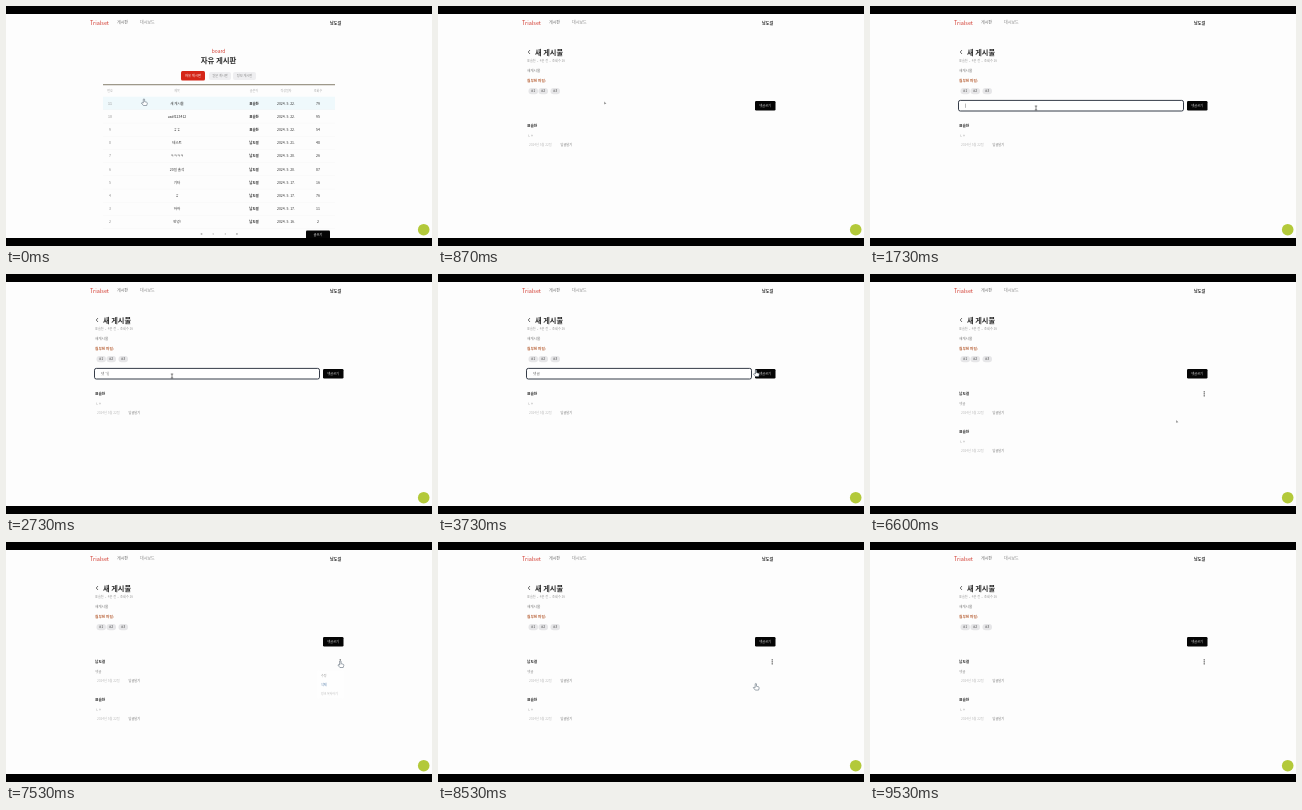
An HTML page that plays this animation: 426 by 240 pixels, repeating every 9590 ms.

```html
<!DOCTYPE html>
<html>
<head>
<meta charset="utf-8">
<style>
html, body { margin: 0; width: 100%; height: 100%; overflow: hidden; background: #fdfdfd; }
svg { display: block; width: 100%; height: 100%; }
text { font-family: "Noto Sans CJK KR", "Noto Sans CJK", "Noto Sans", sans-serif; white-space: pre; }
</style>
</head>
<body>
<svg id="stage" viewBox="0 0 426 240"></svg>
<script>
const LOOP = 9590, STEPS_PER_MS = 0.015;
const RED = '#d23b30', INK = '#2b2b2b', GREY = '#999', ME = '남도결', OTHER = '표슬찬';

// y is the vertical middle of the text
const text = (x, y, size, str, fill = INK, extra = '') =>
  `<text x="${x}" y="${y + size * 0.37}" font-size="${size}" fill="${fill}" ${extra}>${str}</text>`;
const BOLD = 'font-weight="700"', MID = 'text-anchor="middle"';
const mid = (x, y, size, str, fill, extra = '') => text(x, y, size, str, fill, `${MID} ${extra}`);
const box = (x, y, w, h, fill, r = 0, extra = '') =>
  `<rect x="${x}" y="${y}" width="${w}" height="${h}" rx="${r}" fill="${fill}" ${extra}/>`;
const group = (id, body) => `<g id="${id}">${body}</g>`;

const header =
  text(84, 17, 5.5, 'Trialset', RED, 'font-weight="500"') +
  text(111, 17, 4, '게시판', '#666') +
  text(134, 17, 4, '대시보드', '#888') +
  text(324, 17, 4.1, ME, INK, BOLD);

const posts = [
  ['새 게시물', 22, 79], ['asdf123412', 22, 95], ['ㅎㅎ', 22, 54], ['테스트', 21, 48],
  ['ㅋㅋㅋㅋ', 20, 26], ['20일 출석', 20, 87], ['기타', 17, 16], ['ㅎ', 17, 76],
  ['하하', 17, 11], ['안녕!', 16, 2]
];
const columns = [104, 171, 248, 280, 312];

function postRow([title, day, views], i) {
  const y = 97.3 + i * 13.2;
  const cells = [11 - i, title, i < 3 ? OTHER : ME, `2024. 5. ${day}.`, views];
  return box(97, y - 6.6, 232, 13.2, i ? 'none' : '#eff9fc') +
    box(97, y + 6.4, 232, 0.3, '#f0f0f0') +
    cells.map((c, k) => mid(columns[k], y, 3.5, c, k ? INK : '#888', k == 2 ? BOLD : 'font-weight="500"')).join('');
}

const board =
  mid(212.5, 45, 4.9, 'board', RED) +
  mid(212.5, 54.5, 7.4, '자유 게시판', INK, BOLD) +
  box(175, 65, 24, 9.5, '#d52618', 1.5) + mid(187, 69.7, 3.3, '자유 게시판', '#fff') +
  box(203, 66, 22, 8, '#eeeef0', 2) + mid(214, 70, 3.2, '질문 게시판', '#888') +
  box(227, 66, 23, 8, '#eeeef0', 2) + mid(238.5, 70, 3.2, '정보 게시판', '#888') +
  box(97, 78.3, 232, 0.9, '#77705c') +
  ['번호', '제목', '글쓴이', '작성일자', '조회수'].map((h, i) => mid(columns[i], 85, 3, h, '#aaa')).join('') +
  posts.map(postRow).join('') +
  ['«', '‹', '›', '»'].map((c, i) => mid(195.5 + i * 11.8, 227.5, 4.5, c, '#555')).join('') +
  box(300, 224.5, 24, 9, '#050505', 1) + mid(312, 229, 3.2, '글쓰기', '#eee');

const comment = (y, name, body) =>
  text(89, y, 3.7, name, INK, BOLD) +
  text(89.5, y + 10, 3.2, body, '#888') +
  text(91, y + 19, 3.2, '2024년 5월 22일', '#bbb') +
  text(122.5, y + 19, 3.2, '답글달기', '#777');

const article =
  '<path d="M92 44l-1.8 2 1.8 2" fill="none" stroke="#333" stroke-width=".7"/>' +
  text(97, 46, 7.2, '새 게시물', INK, BOLD) +
  text(89, 55, 3.2, OTHER + '  •  4분 전  •  조회수 16', GREY) +
  text(89, 64.7, 3.6, '새게시물', '#777') +
  text(89, 74.3, 3.7, '첨부된 파일:', '#b9653c', BOLD) +
  [90.5, 100.5, 112.5].map((x, i) =>
    box(x, 82, 9.5, 6.3, '#e6e6e8', 3) + mid(x + 4.75, 85.1, 3.5, '#' + (i + 1), '#444')).join('') +
  group('field',
    box(88.5, 94.4, 225, 10.6, '#fff', 1.8, 'stroke="#353c48" stroke-width="1"') +
    '<text id="typed" x="95" y="101.2" font-size="3.7" fill="#777"></text>' +
    box(95, 97.6, 0.5, 4.2, '#777', 0, 'id="caret"')) +
  box(317, 95, 20.5, 9.5, '#050505', 1.2) + mid(327.2, 99.7, 3.1, '댓글쓰기', '#ddd') +
  group('before', comment(119.5, OTHER, 'ㄴㅇ')) +
  group('after',
    comment(120, ME, '댓글') + comment(157.5, OTHER, 'ㄴㅇ') +
    [117.8, 119.8, 121.8].map(y => `<circle cx="334.2" cy="${y}" r=".65" fill="#222"/>`).join('')) +
  group('menu',
    box(311, 128.5, 27, 28, '#fefefe', 1.5) +
    text(315, 134, 3, '수정', GREY) +
    text(315, 143, 3.1, '삭제', '#557eab') +
    text(315, 152, 2.9, '링크 복사하기', '#bbb'));

const pointers =
  group('hand', '<path d="M-.7-2.8q.7-.7 1.3 0V-.3l2 .5q.8.3.7 1.2L2.7 3.5H-.6L-2.6 1q.5-.8 1.9 0z" fill="#fff" stroke="#52606e" stroke-width=".55"/>') +
  group('beam', '<path d="M-1.2-2H1.2M0-2V2M-1.2 2H1.2" fill="none" stroke="#333" stroke-width=".6"/>') +
  group('arrow', '<path d="M-.8-1.4V1.6L0 .9 1.4.8z" fill="#777" stroke="#fff" stroke-width=".2"/>');

document.getElementById('stage').innerHTML =
  box(0, 0, 426, 240, '#fdfdfd') + header + group('board', board) + group('article', article) +
  group('pointer', pointers) +
  '<circle cx="417.7" cy="223.7" r="5.8" fill="#b3c93a"/>' +
  box(0, 0, 426, 8, '#000') + box(0, 232, 426, 8, '#000');

const $ = id => document.getElementById(id);
const show = (id, on) => $(id).setAttribute('display', on ? 'inline' : 'none');

// time, x, y
const path = [
  [0, 138, 96], [300, 138, 96], [600, 167, 97], [1000, 167, 97], [1400, 166, 102], [3200, 166, 102],
  [3730, 318, 99], [3950, 327, 100], [4600, 327, 100], [5400, 329, 126], [5900, 329, 126],
  [6400, 307, 147.5], [6800, 307, 147.5], [7300, 334.5, 122], [7700, 334.5, 122],
  [8100, 318, 144], [8500, 318, 144], [9200, 300, 236]
];
const ease = u => u * u * (3 - 2 * u);

function pointerAt(t) {
  const i = path.findIndex(p => p[0] > t);
  if (i < 0) return path.at(-1).slice(1);
  const [t0, x0, y0] = path[i - 1], [t1, x1, y1] = path[i];
  const u = ease((t - t0) / (t1 - t0));
  return [x0 + (x1 - x0) * u, y0 + (y1 - y0) * u];
}

const typing = ['', 'ㄷ', '대', '댓', '댓ㄱ', '댓그', '댓글'];

function draw(t) {
  const onBoard = t < 800, posted = t >= 4300;
  show('board', onBoard);
  show('article', !onBoard);
  show('field', t >= 1500 && !posted);
  show('before', !posted);
  show('after', posted);
  show('menu', t >= 7400 && t < 8350);

  const typed = typing[Math.max(0, Math.min(6, Math.floor((t - 2100) / 150)))];
  $('typed').textContent = typed;
  $('caret').setAttribute('x', 95 + typed.length * 3.4);
  show('caret', t < 3200 && (t - 1500) % 1000 < 500);

  const [x, y] = pointerAt(t);
  const beam = !onBoard && !posted && x < 314 && y > 99;
  const hand = !beam && (onBoard || x > 314);
  show('pointer', t < 9200);
  show('beam', beam);
  show('hand', hand);
  show('arrow', !beam && !hand);
  $('pointer').setAttribute('transform', `translate(${x} ${y})`);
}

function tick() {
  const t = performance.now() % LOOP;
  draw(Math.floor((t + 4) * STEPS_PER_MS) / STEPS_PER_MS);
  requestAnimationFrame(tick);
}
tick();
</script>
</body>
</html>
```
